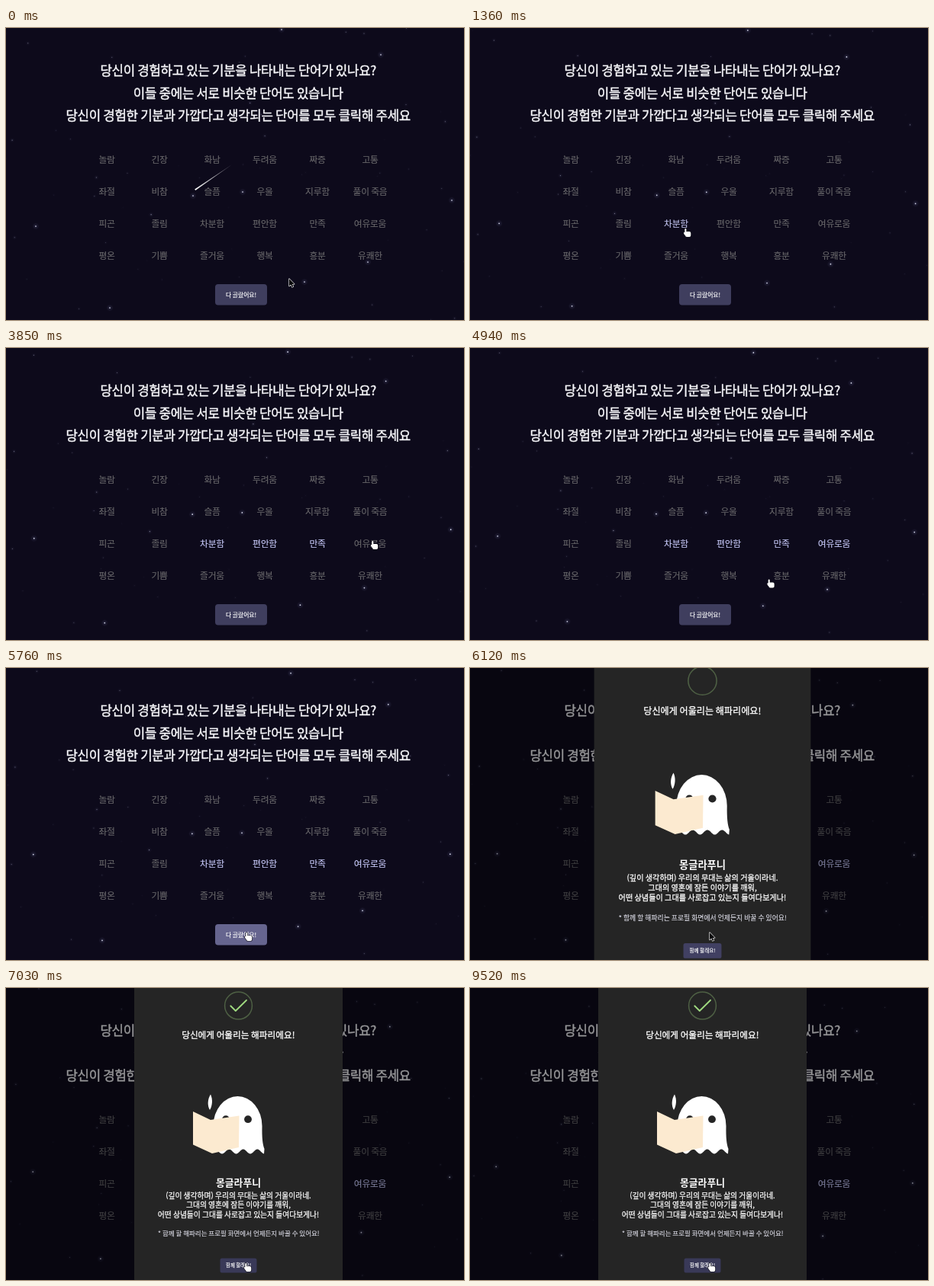
An HTML page with a canvas that plays this animation: 600x383 px, repeating every 9.55 s.

```html
<!DOCTYPE html>
<html lang="ko">
<head>
<meta charset="utf-8">
<title>기분 단어 고르기</title>
<style>
html, body { margin: 0; width: 100%; height: 100%; overflow: hidden; background: #0d0a1b; }
canvas { display: block; width: 600px; height: 383px; }
</style>
</head>
<body>
<canvas id="stage"></canvas>
<script>
const W = 600, H = 383, LOOP = 9550, OPEN = 6000, TAU = Math.PI * 2;
const FONT = '"Noto Sans CJK KR", "Noto Sans CJK", "Noto Sans CJK JP", sans-serif';
const canvas = document.getElementById('stage');
const ctx = canvas.getContext('2d');
const dpr = window.devicePixelRatio || 1;
canvas.width = W * dpr;
canvas.height = H * dpr;

const clamp = v => Math.max(0, Math.min(1, v));
const span = (t, a, b) => clamp((t - a) / (b - a));
const ease = v => v * v * (3 - 2 * v);
const mix = (a, b, k) => a + (b - a) * k;
const blend = (a, b, k) => `rgb(${a.map((v, i) => Math.round(mix(v, b[i], k)))})`;

// y is the optical middle of the line
function label(str, x, y, size, { color = '#fff', weight = 400, spacing = 0, heavy = 0 } = {}) {
  ctx.font = `${weight} ${size}px ${FONT}`;
  ctx.letterSpacing = spacing + 'px';
  ctx.textAlign = 'center';
  ctx.fillStyle = ctx.strokeStyle = color;
  ctx.lineWidth = heavy;
  ctx.lineJoin = 'round';
  const base = y + size * 0.37;
  ctx.fillText(str, x, base);
  if (heavy) ctx.strokeText(str, x, base);
}

function box(x, y, w, h, r, color) {
  ctx.fillStyle = color;
  ctx.beginPath();
  ctx.roundRect(x, y, w, h, r);
  ctx.fill();
}

function disc(x, y, r, color) {
  ctx.fillStyle = color;
  ctx.beginPath();
  ctx.arc(x, y, r, 0, TAU);
  ctx.fill();
}

function poly(points, color) {
  ctx.fillStyle = color;
  ctx.beginPath();
  points.forEach(([x, y]) => ctx.lineTo(x, y));
  ctx.closePath();
  ctx.fill();
}

// Sky: a few bright stars among seeded faint ones, slowly turning
const stars = [[361, 2], [491, 35], [245, 220], [310, 215], [584, 226], [39, 260], [474, 307], [136, 367], [391, 333]]
  .map(([x, y]) => ({ x, y, light: .9 }));
let seed = 11;
const rnd = () => (seed = (seed * 16807) % 2147483647) / 2147483647;
for (let i = 0; i < 60; i++) stars.push({ x: rnd() * W, y: rnd() * H, light: .06 + .44 * rnd() ** 2 });

function drawSky(t) {
  ctx.fillStyle = '#0d0a1b';
  ctx.fillRect(0, 0, W, H);
  const turn = t * 0.0000107, cos = Math.cos(turn), sin = Math.sin(turn), cx = 288, cy = 200;
  for (const star of stars) {
    const dx = star.x - cx, dy = star.y - cy;
    const x = cx + dx * cos - dy * sin, y = cy + dx * sin + dy * cos;
    const r = 2 + star.light * 3;
    const glow = ctx.createRadialGradient(x, y, 0, x, y, r);
    glow.addColorStop(0, `rgba(150,155,215,${.2 * star.light})`);
    glow.addColorStop(1, 'rgba(150,155,215,0)');
    disc(x, y, r, glow);
    disc(x, y, .4 + star.light * .5, `rgba(236,238,255,${star.light})`);
  }
  drawMeteor(span(t, 0, 320));
}

function drawMeteor(k) {
  if (k >= 1) return;
  const x = 248 - 100 * k, y = 212 + 69 * k, len = 1 - .5 * k;
  const tx = x + 49 * len, ty = y - 33.5 * len;
  const tail = ctx.createLinearGradient(x, y, tx, ty);
  tail.addColorStop(0, `rgba(255,255,255,${1 - k})`);
  tail.addColorStop(1, `rgba(255,255,255,${.3 * (1 - k)})`);
  poly([[x - .5, y - .7], [tx, ty], [x + .5, y + .8]], tail);
}

// Word page
const heading = [
  '당신이 경험하고 있는 기분을 나타내는 단어가 있나요?',
  '이들 중에는 서로 비슷한 단어도 있습니다',
  '당신이 경험한 기분과 가깝다고 생각되는 단어를 모두 클릭해 주세요'
];
const words = [
  ['놀람', '긴장', '화남', '두려움', '짜증', '고통'],
  ['좌절', '비참', '슬픔', '우울', '지루함', '풀이 죽음'],
  ['피곤', '졸림', '차분함', '편안함', '만족', '여유로움'],
  ['평온', '기쁨', '즐거움', '행복', '흥분', '유쾌한']
];
const picks = ['차분함', '편안함', '만족', '여유로움'];
const arrival = i => 1100 + i * 900;
const colX = c => 132 + c * 69, rowY = r => 172.8 + r * 41.8;
const pageButton = [274, 336, 68, 27.5], dialogButton = [280.5, 354.5, 48, 19];

function drawPage(t) {
  heading.forEach((line, i) =>
    label(line, 304.2, 55.7 + i * 29.6, 16.8, { color: '#f7f7fa', spacing: -.3, heavy: .45 }));
  words.forEach((row, r) => row.forEach((word, c) => {
    const i = picks.indexOf(word);
    const on = i < 0 ? 0 : span(t - arrival(i), 150, 270);
    label(word, colX(c), rowY(r), 11.8, {
      color: blend([104, 103, 106], [200, 202, 250], on),
      spacing: -.25,
      heavy: .12
    });
  }));
  const hover = span(t, 5080, 5200) * (1 - span(t, OPEN, OPEN + 100));
  box(...pageButton, 4, blend([63, 62, 94], [102, 101, 143], hover));
  label('다 골랐어요!', 308, 349.8, 7.8, { heavy: .18 });
}

// Result dialog
function drawGhost() {
  ctx.fillStyle = '#fff';
  ctx.beginPath();
  ctx.ellipse(303.5, 181, 32, 39, 0, Math.PI, TAU);
  ctx.quadraticCurveTo(335, 203, 338.5, 211);
  for (let x = 338; x >= 271; x--) ctx.lineTo(x, 214.5 + 3 * Math.cos((x - 320) * TAU / 18.5));
  ctx.fill();
  for (const x of [288, 317]) disc(x, 172.2, 4.9, '#252525');

  poly([[245, 162], [268, 173], [305.5, 167.5], [305, 209], [270, 217], [245, 205.5]], '#fcead0');

  ctx.fillStyle = '#fff';
  ctx.beginPath();
  ctx.moveTo(268, 139.5);
  ctx.bezierCurveTo(271, 146, 270.5, 154, 267, 160);
  ctx.bezierCurveTo(263.5, 154, 264, 146, 268, 139.5);
  ctx.fill();
}

function drawCheck(age) {
  ctx.strokeStyle = 'rgba(165,220,134,.32)';
  ctx.lineWidth = 1.5;
  ctx.beginPath();
  ctx.arc(304.5, 23.2, 17.9, 0, TAU);
  ctx.stroke();

  const short = span(age, 405, 530), long = span(age, 530, 640);
  if (!short) return;
  ctx.strokeStyle = '#a0db80';
  ctx.lineWidth = 1.8;
  ctx.lineCap = ctx.lineJoin = 'round';
  ctx.beginPath();
  ctx.moveTo(294.3, 23.5);
  ctx.lineTo(mix(294.3, 300.8, short), mix(23.5, 30, short));
  if (long) ctx.lineTo(mix(300.8, 315, long), mix(30, 16, long));
  ctx.stroke();
}

// Pops past full size, dips below it, then settles
function popScale(age) {
  const rise = ease(span(age, 0, 135)), dip = ease(span(age, 135, 240)), settle = ease(span(age, 240, 300));
  return .7 + .35 * rise - .1 * dip + .05 * settle;
}

function drawDialog(t) {
  const age = t - OPEN;
  if (age < 0) return;
  ctx.fillStyle = `rgba(0,0,0,${.4 * span(age, 0, 100)})`;
  ctx.fillRect(0, 0, W, H);

  const scale = popScale(age), cx = 304.5, cy = 189.5;
  ctx.save();
  ctx.translate(cx, cy);
  ctx.scale(scale, scale);
  ctx.translate(-cx, -cy);
  box(168, -6, 273, 390.5, 3, '#252525');
  drawCheck(age);
  label('당신에게 어울리는 해파리에요!', 304.3, 61.3, 11.65, { heavy: .3 });
  drawGhost();
  label('몽글라푸니', cx, 255, 12.8, { weight: 700 });
  [
    '(깊이 생각하며) 우리의 무대는 삶의 거울이라네.',
    '그대의 영혼에 잠든 이야기를 깨워,',
    '어떤 상념들이 그대를 사로잡고 있는지 들여다보게나!'
  ].forEach((line, i) => label(line, cx, 272.3 + i * 12.5, 9.75, { heavy: .25 }));
  label('* 함께 할 해파리는 프로필 화면에서 언제든지 바꿀 수 있어요!', 304.8, 322.3, 8.5, { color: '#d6d6e0', heavy: .15 });
  box(...dialogButton, 2.5, blend([65, 64, 98], [57, 57, 88], span(t, 6750, 6850)));
  label('함께 할래요!', cx, 364, 6.4, { heavy: .15 });
  ctx.restore();
}

// Pointer: glides to each stop, arriving at its time
const stops = [
  ...picks.map((_, i) => ({ at: arrival(i), x: 281 + i * 66, y: 263 - i * 3.3 })),
  { at: 5250, x: 314, y: 347 },
  { at: 6850, x: 313, y: 361 }
];

function pointerAt(t) {
  let x = 371, y = 329;
  for (const stop of stops) {
    const k = ease(span(t, stop.at - 650, stop.at));
    x = mix(x, stop.x, k);
    y = mix(y, stop.y, k);
  }
  return [x, y];
}

const inside = (x, y, [bx, by, w, h]) => x >= bx && x <= bx + w && y >= by && y <= by + h;

function overLink(x, y, t) {
  if (t > OPEN) return inside(x, y, dialogButton);
  return inside(x, y, pageButton) ||
    words.some((row, r) => row.some((_, c) => inside(x, y, [colX(c) - 22, rowY(r) - 9, 44, 18])));
}

function outlined(path, fill, line) {
  ctx.lineJoin = 'round';
  ctx.lineWidth = 1.2;
  ctx.strokeStyle = line;
  ctx.stroke(path);
  ctx.fillStyle = fill;
  ctx.fill(path);
}

function drawPointer(t) {
  const [x, y] = pointerAt(t);
  ctx.save();
  ctx.translate(x, y);
  if (overLink(x, y, t)) {
    const hand = new Path2D();
    hand.roundRect(.3, 0, 2, 8, 1);
    hand.roundRect(1, 4, 7.2, 7, 2);
    hand.ellipse(.8, 7.3, 1.2, 2.8, -.6, 0, TAU);
    outlined(hand, '#fff', '#15141c');
  } else {
    outlined(new Path2D('M0 0V9.6L2.2 7.6 3.8 11 5.4 10.3 3.9 7 6.8 6.8Z'), '#0a0a0c', '#fff');
  }
  ctx.restore();
}

function frame(now) {
  const t = now % LOOP;
  ctx.setTransform(dpr, 0, 0, dpr, 0, 0);
  drawSky(t);
  drawPage(t);
  drawDialog(t);
  drawPointer(t);
}

const start = performance.now();
function tick() {
  frame(performance.now() - start);
  requestAnimationFrame(tick);
}
tick();
</script>
</body>
</html>
```
